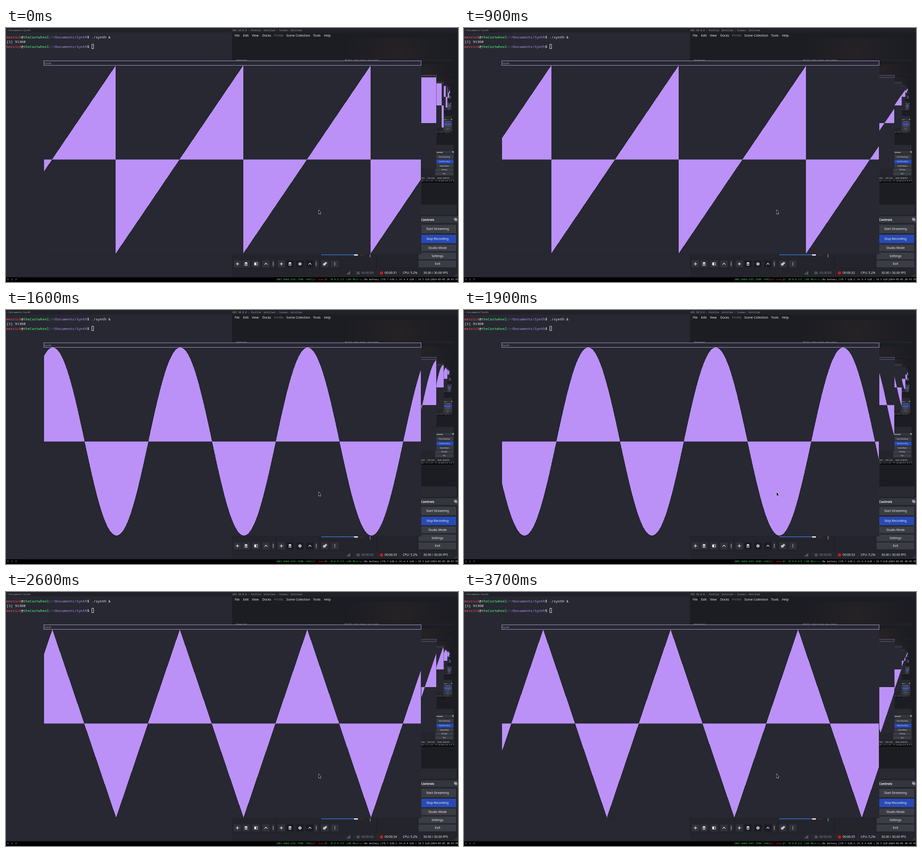
Animation, 998 px wide and 561 px high, one loop 3800 ms. Source, as an HTML page with a canvas:

```html
<!DOCTYPE html>
<html lang="en">
<head>
<meta charset="utf-8">
<title>Synth</title>
<style>
html, body { margin: 0; width: 100%; height: 100%; overflow: hidden; background: #272832; }
canvas { display: block; }
</style>
</head>
<body>
<canvas id="stage" width="998" height="561"></canvas>
<script>
const W = 998, H = 561, LOOP = 3800, STEP = 100;
const LAG = 0.036;                    // delay of each nested screen capture, s
const PERIOD = 281.4, SHIFT = 12.216; // wave length and advance per audio buffer, px
const BUFFERS = 48000 / 1024;         // audio buffers per second
const PURPLE = '#bb91f7', GREEN = '#50fa7b', RED = '#ff5555', WHITE = '#f0f0f0', DARK = '#272832';
const MONO = '"Noto Sans Mono", "DejaVu Sans Mono", monospace';
const SANS = '"Noto Sans", "Open Sans", sans-serif';
const ctx = document.getElementById('stage').getContext('2d');

function box(x, y, w, h, color) {
  ctx.fillStyle = color;
  ctx.fillRect(x, y, w, h);
}

function text(s, x, y, color, size = 5.23, family = MONO, align = 'left', weight = '') {
  ctx.font = `${weight} ${size}px ${family}`;
  ctx.textAlign = align;
  ctx.fillStyle = color;
  ctx.fillText(s, x, y);
}

const label = (s, x, y, color = WHITE, align = 'left') => text(s, x, y, color, 6.83, SANS, align);

function dot(x, y, r, color) {
  ctx.fillStyle = color;
  ctx.beginPath();
  ctx.arc(x, y, r, 0, 7);
  ctx.fill();
}

function stroke(points, color = WHITE, width = 1.2, closed = false) {
  ctx.beginPath();
  points.forEach(([x, y]) => ctx.lineTo(x, y));
  if (closed) ctx.closePath();
  ctx.strokeStyle = color;
  ctx.lineWidth = width;
  ctx.stroke();
}

const icons = {
  plus(x, y) { box(x - 3.5, y - .6, 7, 1.2, WHITE); box(x - .6, y - 3.5, 1.2, 7, WHITE); },
  trash(x, y) {
    box(x - 3, y - 3, 6, 1, WHITE);
    box(x - 1, y - 4, 2, 1, WHITE);
    ctx.strokeStyle = WHITE;
    ctx.lineWidth = 1;
    ctx.strokeRect(x - 2.2, y - 1.5, 4.4, 4.7);
    box(x - .4, y - 1, .8, 4, WHITE);
  },
  filter(x, y) {
    ctx.strokeStyle = WHITE;
    ctx.lineWidth = .8;
    ctx.strokeRect(x - 3.3, y - 2.8, 6.6, 5.6);
    box(x - 3.3, y - 2.8, 3.6, 5.6, WHITE);
  },
  up(x, y) { stroke([[x - 3.2, y + 1.6], [x, y - 1.6], [x + 3.2, y + 1.6]]); },
  dots(x, y) { for (const d of [-2.6, 0, 2.6]) dot(x, y + d, .8, WHITE); },
  gear(x, y, r = 2.2) {
    ctx.setLineDash([1.2, 1.1]);
    ctx.strokeStyle = WHITE;
    ctx.lineWidth = 1.4;
    ctx.beginPath();
    ctx.arc(x, y, r + .9, 0, 7);
    ctx.stroke();
    ctx.setLineDash([]);
    ctx.beginPath();
    ctx.arc(x, y, r - .4, 0, 7);
    ctx.stroke();
  },
  gears(x, y) { icons.gear(x - 1.2, y + 1, 1.6); icons.gear(x + 2.2, y - 1.8, 1); }
};

function terminal() {
  box(0, 0, 499, 551, DARK);
  box(0, 0, 499, 10, '#212229');
  text('~/Documents/Synth', 1, 7, '#a0a0a0');
  const prompt = [['merrick', RED], ['@', WHITE], ['theCartwheel', GREEN], [':', WHITE],
    ['~/Documents/Synth', PURPLE], ['$', WHITE]];
  const line = (parts, y) => {
    let x = 1;
    for (const [s, color] of parts) {
      text(s, x, y, color, 7.82);
      x += ctx.measureText(s).width;
    }
  };
  line([...prompt, [' ./synth &', WHITE]], 22.9);
  line([['[1] 91360', WHITE]], 33.3);
  line(prompt, 43.6);
  ctx.strokeStyle = WHITE;
  ctx.lineWidth = .9;
  ctx.strokeRect(189.5, 36, 3.8, 9.5);
}

function recorder(t, depth) {
  box(499, 0, 499, 551, '#1c1c23');
  const glow = ctx.createRadialGradient(865, 50, 5, 865, 50, 120);
  glow.addColorStop(0, 'rgba(70,58,42,.2)');
  glow.addColorStop(1, 'rgba(70,58,42,0)');
  ctx.fillStyle = glow;
  ctx.fillRect(740, 22, 258, 50);
  box(499, 0, 499, 10, '#212229');
  text('OBS 30.0.0 - Profile: Untitled - Scenes: Untitled', 500, 7, '#a0a0a0');
  const menu = { File: 505, Edit: 523.5, View: 543, Docks: 566, Profile: 592,
    'Scene Collection': 619, Tools: 678, Help: 702 };
  for (const s in menu) label(s, menu[s], 19.3, s === 'Profile' ? '#77777c' : WHITE);

  if (depth) {
    ctx.save();
    ctx.translate(505.7, 69.1);
    ctx.scale(.485, .485);
    ctx.beginPath();
    ctx.rect(0, 0, W, H);
    ctx.clip();
    screen(t - LAG, depth - 1);
    ctx.restore();
  }

  box(499, 390, 496, 23, '#2a2b32');
  box(499, 413, 499, 138, '#1f2026');
  box(500, 499, 96, 32, '#24252c');
  box(598, 499, 94, 32, '#24252c');
  box(694, 499, 123, 32, '#24252c');
  box(819, 499, 88, 32, '#24252c');
  box(696, 500, 74, 1.6, '#3a70c8');
  box(768.5, 498, 8.5, 4.6, '#f4f4f4');
  text('-5.4', 780.5, 503, '#b02832', 5, SANS);
  icons.dots(804, 503);
  const tools = [['plus', 511], ['trash', 530], ['filter', 552], ['up', 574], ['dots', 590],
    ['plus', 608], ['trash', 627], ['gear', 649], ['up', 671], ['dots', 685],
    ['gears', 704], ['dots', 726]];
  for (const [name, x] of tools) {
    const w = name === 'dots' && x < 700 ? 6 : 16;
    const pressed = x > 620 && x < 680;
    box(x - w / 2, 513.5, w, 15, pressed ? '#1b1c22' : '#30323a');
    icons[name](x, 521);
  }

  box(908, 415, 90, 116, '#24252c');
  box(908, 415.5, 90, 15, '#34363e');
  text('Controls', 916, 425.8, WHITE, 7, SANS, 'left', 'bold');
  ctx.strokeStyle = WHITE;
  ctx.lineWidth = .8;
  ctx.strokeRect(990, 420, 4, 3.5);
  ctx.strokeRect(991.7, 422, 4, 3.5);
  const buttons = [['Start Streaming', 434.5, 19], ['Stop Recording', 456.5, 19],
    ['Studio Mode', 478, 15], ['Settings', 495.8, 15], ['Exit', 513.5, 15]];
  buttons.forEach(([s, y, h], i) => {
    box(911, y, 83, h, i === 1 ? '#284ab4' : '#3b3d45');
    label(s, 952.8, y + h / 2 + 2.4, WHITE, 'center');
  });

  box(499, 532, 499, 19, '#24252c');
  for (const x of [769, 820, 869, 914]) box(x, 535, .6, 12, '#3a3b42');
  for (let i = 0; i < 4; i++) box(752 + i * 2.2, 542.5 - i * 1.8, 1.4, 2 + i * 1.8, '#6c6d72');
  dot(777.5, 541, 1.5, '#77777c');
  ctx.strokeStyle = '#77777c';
  ctx.lineWidth = .7;
  ctx.strokeRect(774.5, 538.6, 6, 4.8);
  label('00:00:00', 784.5, 543.4, '#85858a');
  dot(829, 541, 3.6, '#d01818');
  label('00:00:' + Math.floor(31.6 + t), 836, 543.4);
  label('CPU: 5.2%', 876, 543.4);
  label('30.00 / 30.00 FPS', 921.5, 543.4);
  for (let i = 1; i < 4; i++) stroke([[996, 549 - i * 2], [996 - i * 2, 549]], '#66676c', .5);
}

function statusBar() {
  box(0, 550.5, W, 10.5, '#000');
  const parts = [['1', 2.5, WHITE], ['2', 11.5, PURPLE], ['3', 20.5, PURPLE],
    ['2001:0db8:6281:3500::4463', 597, '#3fd060'], ['|', 676, WHITE], ['W: down', 680, '#e02020'],
    ['|', 703, WHITE], ['E: 10.0.0.215 (100 Mbit/s)', 706, '#3fd060'], ['|', 788.5, WHITE],
    ['No battery', 792, WHITE], ['|', 825.5, WHITE], ['176.7 GiB', 828.5, WHITE],
    ['|', 857.5, WHITE], ['1.14', 861, WHITE], ['|', 875, WHITE],
    ['4.4 GiB | 18.5 GiB', 878.5, WHITE], ['|', 936, WHITE], ['2024-03-05 20:43:35', 938.5, WHITE]];
  for (const [s, x, color] of parts) text(s, x, 557.3, color);
}

const waves = {
  square: p => p < .5 ? 1 : -1,
  saw: p => 2 * p - 1,
  sine: p => Math.sin(2 * Math.PI * p),
  triangle: p => Math.asin(Math.sin(2 * Math.PI * p)) * 2 / Math.PI
};

const waveAt = t => t < -.01 ? 'square' : t < 1.25 ? 'saw' : t < 2.51 ? 'sine' : 'triangle';

// whole audio buffers played so far, with a little clock jitter
const bufferAt = t => Math.floor(13.1 + BUFFERS * t - .4 * Math.sin(2.6 * t));

function synth(t) {
  const left = 84, mid = 290.5, width = 832;
  box(83, 72, 834, 427.5, DARK);
  box(83, 499, 834, .8, '#202128');
  ctx.strokeStyle = '#a596c8';
  ctx.lineWidth = 1;
  ctx.strokeRect(83.5, 72.5, 833, 10);
  text('Synth', 84.5, 79.8, '#a8a8a8');

  const wave = waves[waveAt(t)], offset = bufferAt(t) * SHIFT;
  ctx.beginPath();
  ctx.moveTo(left, mid);
  for (let x = 0; x < width; x++) {
    const turns = (x + 1 - offset) / PERIOD;
    const y = Math.round(mid - 207.5 * wave(turns - Math.floor(turns)));
    ctx.lineTo(left + x, y);
    ctx.lineTo(left + x + 1, y);
  }
  ctx.lineTo(left + width, mid);
  ctx.fillStyle = PURPLE;
  ctx.fill();
}

function pointer() {
  const shape = [[690.4, 402.3], [690.4, 410.2], [692.1, 408.7], [693.4, 411.4],
    [694.5, 410.8], [693.3, 408.2], [695, 408]];
  stroke(shape, '#e8e8e8', 1.1, true);
  ctx.fillStyle = '#0c0c10';
  ctx.fill();
}

function screen(t, depth) {
  terminal();
  recorder(t, depth);
  statusBar();
  synth(t);
  pointer();
}

const start = performance.now();
function tick() {
  const ms = (performance.now() - start) % LOOP;
  screen(Math.floor(ms / STEP) * STEP / 1000, 5);
  requestAnimationFrame(tick);
}
tick();
</script>
</body>
</html>
```
